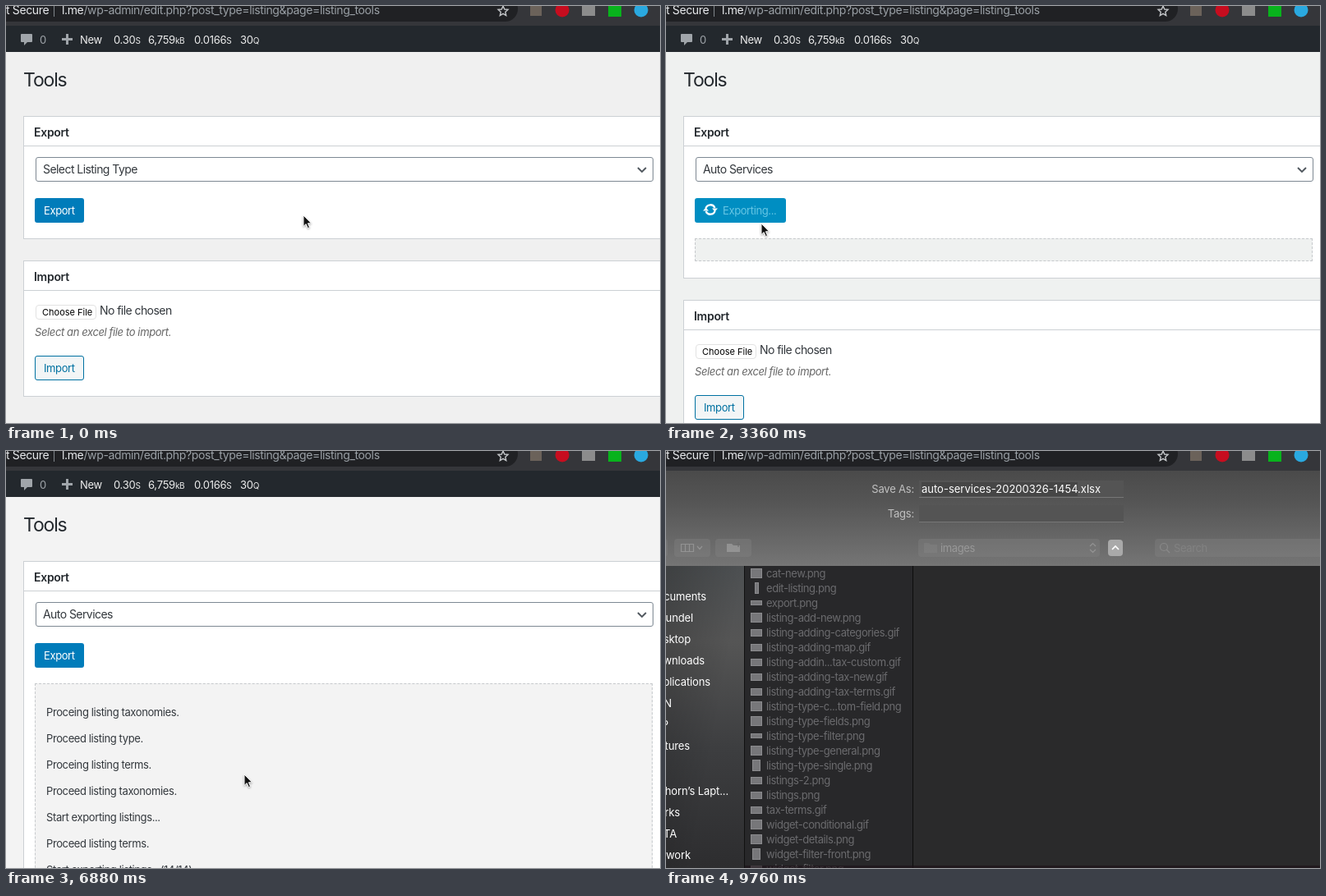
Recreate the animation shown at these times as an HTML page. Size 796 by 508 pixels, loop 9920 ms.

```html
<!DOCTYPE html>
<html lang="en">
<head>
<meta charset="utf-8">
<title>Listing tools</title>
<style>
  html, body { margin: 0; width: 100%; height: 100%; overflow: hidden; }
  body { position: relative; background: #f0f0f0; color: #32373c;
    font: 14px/20px Inter, "Open Sans", sans-serif; letter-spacing: -.04em;
    animation: page 9.92s infinite step-end; }
  p { margin: 0; }
  /* top is the vertical middle of the text */
  .t { position: absolute; margin-top: -10px; white-space: pre; }
  .box { position: absolute; box-sizing: border-box; }
  .s { font-size: 13px; letter-spacing: -.03em; }
  svg { position: absolute; overflow: visible; }
  .clock, .clock * { animation-duration: 9.92s; animation-iteration-count: infinite; animation-timing-function: step-end; }

  #chrome { left: 0; top: 0; width: 100%; height: 24px; background: #35363a; overflow: hidden; z-index: 3; }
  #chrome .t { letter-spacing: -.026em; }
  #pill { left: -30px; top: -12px; width: 653px; height: 31px; border-radius: 16px; background: #202124; }
  #admin { left: 0; top: 24px; width: 100%; height: 32px; background: #23282d; color: #eee; }
  #admin .t { top: 17px; font-size: 13px; letter-spacing: -.02em; }
  #admin small { font-size: 10px; }

  #panels { left: 21px; top: 134px; width: 800px; }
  .panel { position: relative; border: 1px solid #ccd0d4; background: #fff; margin-bottom: 26px; }
  .body { position: relative; }
  .body h2 { margin: 0; height: 35px; border-bottom: 1px solid #ccd0d4; padding-left: 12px;
    font: 600 14px/37px Inter, sans-serif; color: #23282d; letter-spacing: -.02em; }
  .btn { height: 30px; border-radius: 3px; color: #fff; background: #007cba; font-size: 13px; line-height: 31px; letter-spacing: -.03em; padding-left: 11px; }
  #select { left: 14px; top: 49px; width: 752px; height: 30px; border: 1px solid #7e8993; border-radius: 3px; animation-name: focus; }
  #unpicked { animation-name: unpicked; }
  #picked { animation-name: picked; }
  #idle { left: 13px; top: 99px; width: 60px; animation-name: idle; }
  #busy { left: 13px; top: 99px; width: 111px; background: #008ec2; color: #66c6e4; padding-left: 34px; animation-name: busy; }
  #spin { left: 19px; top: 14px; transform-origin: 0 0; animation-name: spin; animation-timing-function: linear; }

  #log { overflow: hidden; animation-name: log; }
  #log > div { margin: 0 0 20px 13px; width: 750px; border: 1px dashed #c6c9cc; padding: 13px 0; background: #f1f1f1; animation-name: page; }
  #log section { animation-name: nudge; }
  #log p { height: 0; visibility: hidden; padding-left: 13px; font-size: 13px; line-height: 45px; letter-spacing: -.03em; white-space: pre;
    animation-name: line; animation-delay: var(--at); }

  #popup { left: 25px; top: 185px; width: 754px; height: 67px; border-radius: 6px; background: #626262; color: #fff;
    font-weight: 600; letter-spacing: -.035em; box-shadow: 0 3px 9px 3px #0003; opacity: 0; animation-name: popup; }
  #hover { left: 0; top: 5px; width: 100%; height: 19px; background: #057dff; animation-name: hover; }

  #sheet { left: 0; top: 20px; width: 100%; height: 488px; overflow: hidden; background: #2a2a2b; color: #fff; animation-name: sheet; }
  #head { left: 0; top: 0; width: 100%; height: 120px; background: linear-gradient(#494949, #555 35%, #757575); }
  #head .lab { right: 494px; color: #c0c0c0; letter-spacing: -.015em; }
  .field { left: 308px; width: 249px; height: 21px; background: #545454; border-bottom: 1px solid #777; }
  .key { border-radius: 4px; background: #8b8b8b; height: 22px; top: 87px; }
  #ring { left: 305px; top: 13px; width: 255px; height: 27px; border: 3px solid #1f78b9; background: #4a4a4a; }
  #mark { left: 311px; top: 18px; width: 190px; height: 17px; background: #3f638b; animation-name: mark; }
  #ring, .lit { animation-name: lit; }
  #row { animation-name: dim; }
  #more { left: 538px; width: 18px; height: 20px; top: 88px; animation-name: more; }
  #side { left: 0; top: 120px; width: 96px; height: 368px; overflow: hidden; border-right: 1px solid #111;
    background: linear-gradient(100deg, #0003, #0000 60%), linear-gradient(#4d5052, #555 25%, #3d3e40 60%, #2d2d2f); }
  #files { left: 96px; top: 120px; width: 205px; height: 368px; overflow: hidden; border-right: 1px solid #0c0c0c; background: #28282a; color: #6b6b6e; }
  #files i { position: absolute; background: #77777a; box-shadow: inset 0 0 0 1px #8b8b8e; }

  #edge { left: 795px; top: 24px; width: 1px; height: 472px; background: #3c3c3c; animation-name: edge; }
  #cursor { left: 0; top: 0; z-index: 9; animation-name: move; animation-timing-function: ease-in-out; }
  #arrow { animation-name: arrow; }
  #hand { animation-name: hand; }

  @keyframes page { 0% { background-color: #f0f0f0 } 16.1% { background-color: #eff1f0 } 46.7%, 100% { background-color: #f3f3f3 } }
  @keyframes focus { 0% { box-shadow: none; border-color: #7e8993 } 9.65% { box-shadow: 0 0 0 1px #007cba; border-color: #007cba } 29%, 100% { box-shadow: none; border-color: #7e8993 } }
  @keyframes unpicked { 0% { visibility: visible } 19.3%, 100% { visibility: hidden } }
  @keyframes picked { 0% { visibility: hidden } 19.3%, 100% { visibility: visible } }
  @keyframes idle { 0% { visibility: visible; background: #007cba } 24.15% { visibility: visible; background: #0071a1 } 29% { visibility: hidden } 64.48%, 100% { visibility: visible; background: #007cba } }
  @keyframes busy { 0% { visibility: hidden } 29% { visibility: visible } 64.48%, 100% { visibility: hidden } }
  @keyframes spin { from { transform: rotate(-675deg) } to { transform: rotate(1317.9deg) } }
  @keyframes log { 0% { max-height: 0 } 29%, 100% { max-height: 500px } }
  @keyframes line { 0% { height: var(--h, 32px); visibility: visible } 46%, 100% { height: 0; visibility: hidden } }
  @keyframes nudge { 0% { transform: none } 64.48%, 100% { transform: translateY(-1px) } }
  @keyframes popup {
    0% { opacity: 0 }
    9.65% { opacity: 1 }
    16.1% { opacity: 1; animation-timing-function: linear }
    19.3%, 100% { opacity: 0 }
  }
  @keyframes hover { 0% { transform: none } 12.87%, 100% { transform: translateY(19px) } }
  @keyframes edge { 0% { visibility: hidden } 75.78% { visibility: visible } 77.39%, 100% { visibility: hidden } }
  @keyframes sheet { 0% { visibility: hidden } 77.39%, 100% { visibility: visible } }
  @keyframes lit { 0% { opacity: 1 } 98.36%, 100% { opacity: 0 } }
  @keyframes dim { 0% { opacity: 1 } 98.36%, 100% { opacity: .3 } }
  @keyframes mark { 0% { background: #3f638b } 98.36%, 100% { background: #464646 } }
  @keyframes more { 0% { background: #8b8b8b } 98.36%, 100% { background: #a9a9a9 } }
  @keyframes arrow { 0% { opacity: 1 } 6.42% { opacity: 0 } 20.9% { opacity: 1 } 24.15% { opacity: 0 } 29%, 100% { opacity: 1 } }
  @keyframes hand { 0% { opacity: 0 } 6.42% { opacity: 1 } 20.9% { opacity: 0 } 24.15% { opacity: 1 } 29%, 100% { opacity: 0 } }
  @keyframes move {
    0%, 1% { transform: translate(362px, 255px) }
    8%, 10.5% { transform: translate(153px, 203px) }
    13.5%, 20.5% { transform: translate(153px, 225px) }
    25.8%, 29.5% { transform: translate(72px, 248px) }
    33.8%, 35.4% { transform: translate(116px, 265px) }
    45.1%, 79% { transform: translate(290px, 394px) }
    85.4% { transform: translate(574px, 472px) }
    87.1%, 88.7% { transform: translate(549px, 472px) }
    90.3% { transform: translate(757px, 482px) }
    91.9%, 100% { transform: translate(770px, 530px) }
  }
</style>
</head>
<body>
<div class="clock">
  <div id="chrome" class="box">
    <div id="pill" class="box"></div>
    <p class="t" style="left:0;top:5px;color:#e8eaed">t Secure</p>
    <div class="box" style="left:58px;top:-2px;width:1px;height:15px;background:#80868b"></div>
    <p class="t" style="left:68px;top:5px;color:#9aa0a6"><span style="color:#e8eaed">l.me</span>/wp-admin/edit.php?post_type=listing&amp;page=listing_tools</p>
    <svg style="left:605px;top:6px"><path d="M0-6 1.8-2 6-1.6 2.8 1.3 3.7 5.6 0 3.4-3.7 5.6-2.8 1.3-6-1.6-1.8-2Z" fill="none" stroke="#c6c8cb" stroke-width="1.4"/></svg>
    <svg style="left:0;top:0">
      <rect x="638" y="0" width="14" height="12" fill="#6b625a"/>
      <circle cx="677" cy="5" r="8.5" fill="#c70d1f"/>
      <rect x="701" y="0" width="16" height="12" fill="#8c8c8c"/>
      <rect x="733" y="0" width="16" height="13" fill="#08b31c"/>
      <circle cx="773" cy="5" r="8.5" fill="#2aa9e0"/>
    </svg>
  </div>

  <div id="admin" class="box">
    <svg style="left:18px;top:10px"><path d="M1 0H13Q14 0 14 1V9Q14 10 13 10H8L4 14V10H1Q0 10 0 9V1Q0 0 1 0Z" fill="#a0a5aa"/></svg>
    <p class="t" style="left:41px;color:#a0a5aa">0</p>
    <svg style="left:68px;top:10px"><path d="M6.5 0V13M0 6.5H13" stroke="#a0a5aa" stroke-width="3"/></svg>
    <p class="t" style="left:90px">New</p>
    <p class="t" style="left:131px">0.30<small>S</small></p>
    <p class="t" style="left:173px">6,759<small>kB</small></p>
    <p class="t" style="left:229px">0.0166<small>S</small></p>
    <p class="t" style="left:285px">30<small>Q</small></p>
  </div>

  <p class="t" style="left:21px;top:90px;font-size:23px;letter-spacing:-.05em;color:#23282d">Tools</p>

  <div id="panels" class="box">
    <div class="panel">
      <div class="body" style="height:148px">
        <h2>Export</h2>
        <div id="select" class="box">
          <p id="unpicked" class="t" style="left:8px;top:14px">Select Listing Type</p>
          <p id="picked" class="t" style="left:8px;top:14px">Auto Services</p>
          <svg style="left:732px;top:12px"><path d="M0 0 5 5 10 0" fill="none" stroke="#50575e" stroke-width="1.9"/></svg>
        </div>
        <div id="idle" class="btn box">Export</div>
        <div id="busy" class="btn box">Exporting...
          <svg id="spin" width="1" height="1"><g fill="none" stroke="#fff" stroke-width="2.3"><path d="M-5.6-1.5A5.8 5.8 0 0 1 5.4-2"/><path d="M5.6 1.5A5.8 5.8 0 0 1-5.4 2"/></g><path d="M2-1.6H9L5.5 2.6ZM-2 1.6H-9L-5.5-2.6Z" fill="#fff"/></svg>
        </div>
      </div>
      <div id="log"><div><section>
        <p style="--at:3.995s">Proceing listing taxonomies.</p>
        <p style="--at:4.155s">Proceed listing type.</p>
        <p style="--at:4.315s">Proceing listing terms.</p>
        <p style="--at:4.475s">Proceed listing taxonomies.</p>
        <p style="--at:4.795s">Start exporting listings...</p>
        <p style="--at:4.955s">Proceed listing terms.</p>
        <p style="--at:5.275s">Start exporting listings...(14/14)</p>
        <p style="--at:3.995s;--h:13px"></p>
      </section></div></div>
    </div>
    <div class="panel">
      <div class="body" style="height:164px">
        <h2>Import</h2>
        <div class="box" style="left:14px;top:53px;width:74px;height:18px;border:1px solid #e2e2e2;border-radius:4px"></div>
        <p class="t" style="left:22px;top:62px;font-size:11px;color:#000;letter-spacing:0">Choose File</p>
        <p class="t" style="left:92px;top:60px">No file chosen</p>
        <p class="t s" style="left:13px;top:86px;color:#666;font-style:italic">Select an excel file to import.</p>
        <div class="btn box" style="left:13px;top:115px;width:60px;border:1px solid #0071a1;background:#f3f5f6;color:#0071a1;line-height:29px;padding-left:10px">Import</div>
      </div>
    </div>
  </div>

  <div id="popup" class="box">
    <div id="hover" class="box"></div>
    <svg style="left:8px;top:14px"><path d="M0 1 3 5 8-4" fill="none" stroke="#fff" stroke-width="1.8"/></svg>
    <p class="t" style="left:22px;top:14px">Select Listing Type</p>
    <p class="t" style="left:22px;top:33px">Auto Services</p>
    <p class="t" style="left:22px;top:52px">Restaurants</p>
  </div>

  <div id="edge" class="box"></div>

  <div id="sheet" class="box">
    <div id="head" class="box">
      <p class="t s lab" style="top:26px">Save As:</p>
      <p class="t s lab" style="top:56px">Tags:</p>
      <div class="field box" style="top:16px"></div>
      <div class="field box" style="top:46px"></div>
      <div id="ring" class="box"></div>
      <div id="mark" class="box"></div>
      <p class="t s" style="left:311px;top:26px;letter-spacing:0">auto-services-20200326-1454.xlsx</p>
      <div id="row">
        <div class="key box" style="left:-20px;width:22px"></div>
        <div class="key box" style="left:10px;width:44px"></div>
        <div class="key box" style="left:60px;width:44px"></div>
        <div class="key box" style="left:307px;width:221px"></div>
        <div class="key box" style="left:595px;width:220px"></div>
        <svg style="left:0;top:98px" fill="none" stroke="#eee" stroke-width="1.2">
          <path d="M18.5-4.5H33.5V4.5H18.5ZM23.5-4.5V4.5M28.5-4.5V4.5M38-2 41 1.5 44-2M516-2 519.5-5.5 523-2M516 2 519.5 5.5 523 2"/>
          <path d="M74-5H80L82-3H90V5H74Z" fill="#eee" stroke="none"/>
          <path d="M88-7V-1M85-4H91" stroke="#777"/>
          <circle cx="606" cy="-1" r="4.5" stroke="#ccc"/><path d="M609 2 613 6" stroke="#ccc"/>
          <path d="M314-6H320L322-4H330V6H314Z" fill="#a0a0a0" stroke="none"/>
          <path class="lit" d="M314-6H320L322-4H330V6H314Z" fill="#55b7ea" stroke="none"/>
        </svg>
        <p class="t s" style="left:334px;top:98px">images</p>
        <p class="t s" style="left:618px;top:98px;color:#b5b5b5">Search</p>
      </div>
      <div id="more" class="key box"><svg style="left:5px;top:12px"><path d="M0 0 4-4 8 0" fill="none" stroke="#fff" stroke-width="1.6"/></svg></div>
    </div>
    <div id="side" class="box"></div>
    <div id="files" class="box"></div>
    <div class="box" style="left:96px;top:485px;width:700px;height:3px;background:#1d1219aa"></div>
  </div>

  <svg id="cursor" width="1" height="1">
    <path id="arrow" d="M0 0V13.5L3.2 10.6 5.3 15.6 7.5 14.7 5.4 9.8H9.6Z" fill="#111" stroke="#fff" stroke-width="1" style="filter:drop-shadow(0 1px 1px #0005)"/>
    <path id="hand" d="M-1 1.2Q-1 0 .3 0T1.7 1.2V6Q3.5 4.8 4.4 6.3 6 5.5 6.7 7 8.6 6.4 8.8 8.2V11Q8.6 13 7.5 14V16.5H.2V15L-3.8 9.8Q-4.2 8.2-2.7 8.3L-1 9.8Z" fill="#fff" stroke="#222" stroke-width="1.1"/>
  </svg>
</div>
<script>
  const side = document.getElementById('side'), files = document.getElementById('files');
  const text = (box, label, css) => {
    const p = document.createElement('p');
    p.className = 't s';
    p.style.cssText = css;
    p.textContent = label;
    box.append(p);
  };

  // label, right end, middle
  const places = [['Documents', 49, 177], ['undel', 33, 203], ['Desktop', 30, 229], ['Downloads', 47, 255],
    ['Applications', 54, 281], ['N', 7, 307], ['P', 3, 333], ['Pictures', 29, 359],
    ['horn’s Lapt...', 76, 414], ['rks', 17, 440], ['TA', 13, 466], ['Network', 30, 492]];
  for (const [label, end, y] of places)
    text(side, label, `right:${95 - end}px;top:${y - 140}px;letter-spacing:-.01em`);

  const names = `cat-new.png edit-listing.png export.png listing-add-new.png listing-adding-categories.gif
    listing-adding-map.gif listing-addin...tax-custom.gif listing-adding-tax-new.gif listing-adding-tax-terms.gif
    listing-type-c...tom-field.png listing-type-fields.png listing-type-filter.png listing-type-general.png
    listing-type-single.png listings-2.png listings.png tax-terms.gif widget-conditional.gif widget-details.png
    widget-filter-front.png widget-filter.png`.split(/\s+/);
  const sizes = { wide: [14, 9], thin: [5, 14], flat: [14, 6], full: [14, 12], tall: [10, 14] };
  const kinds = { 0: 'full', 1: 'thin', 2: 'flat', 3: 'full', 9: 'full', 10: 'full', 11: 'flat', 12: 'full', 13: 'tall', 17: 'full', 18: 'full', 19: 'tall' };
  names.forEach((name, n) => {
    const y = 9 + n * 18, [w, h] = sizes[kinds[n] || 'wide'];
    const icon = document.createElement('i');
    icon.style.cssText = `left:${14 - w / 2}px;top:${y - h / 2}px;width:${w}px;height:${h}px`;
    files.append(icon);
    text(files, name, `left:26px;top:${y}px;letter-spacing:-.034em`);
  });
</script>
</body>
</html>
```
